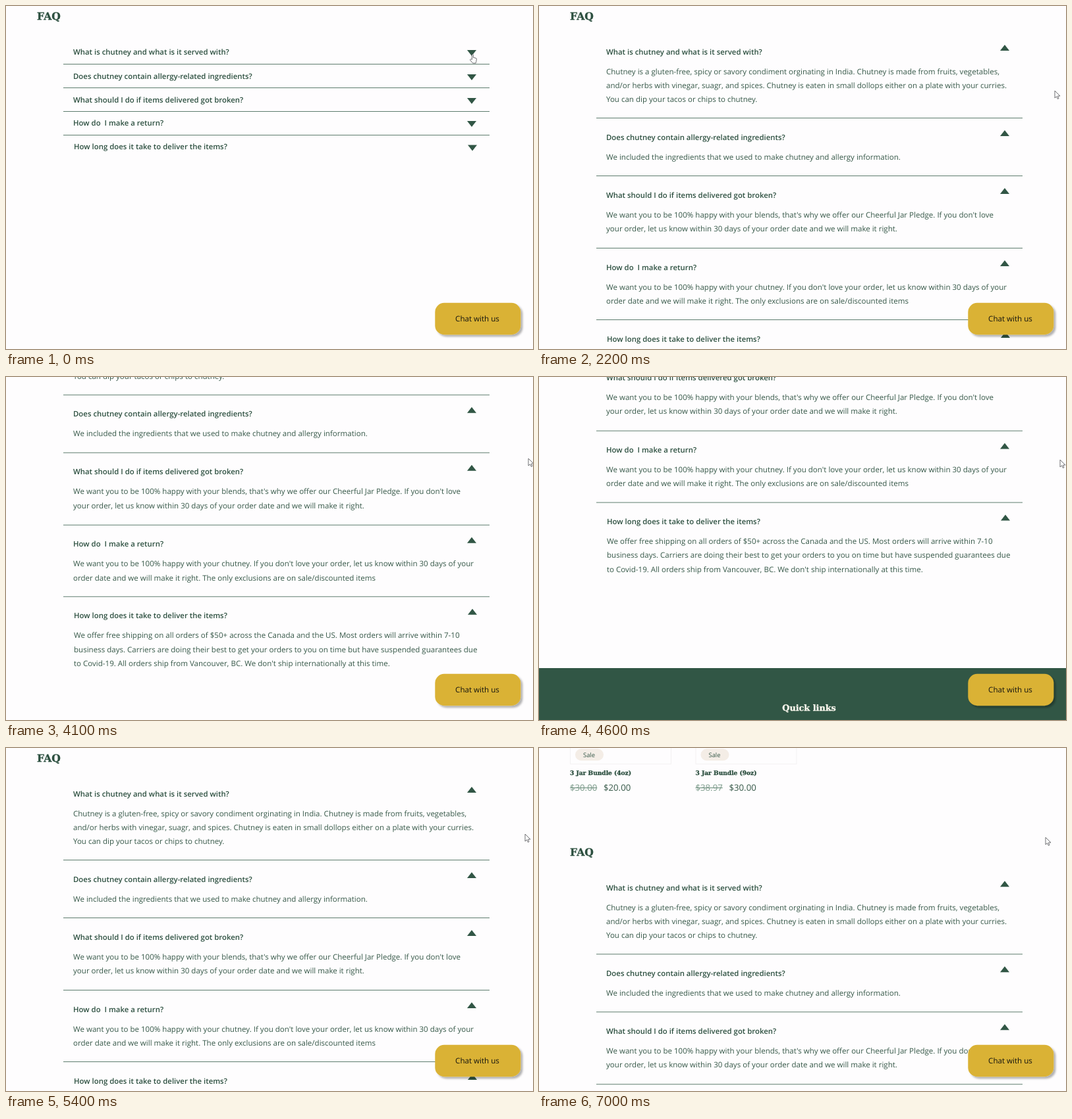
An HTML page that plays this animation: 800x522 px, repeating every 7.1 s.

```html
<!DOCTYPE html>
<html lang="en">
<head>
<meta charset="utf-8">
<title>FAQ</title>
<style>
  html, body { margin: 0; width: 100%; height: 100%; overflow: hidden; background: #fefdfe; }
  svg { display: block; }
  text { font: 11.55px "Open Sans", "Liberation Sans", sans-serif; fill: #365848; white-space: pre; text-rendering: geometricPrecision; }
  .question { font-size: 11.4px; font-weight: 600; fill: #2d5040; }
  .serif { font-family: "DejaVu Serif", serif; font-weight: bold; fill: #2d5040; stroke: #2d5040; stroke-width: .35; }
  .title { font-size: 15.6px; }
  .product { font-size: 9.05px; }
  .price { font-size: 13.2px; }
  .old { fill: #7b9a8a; text-decoration: line-through; }
  .sale { font-size: 9.4px; }
  .links { font-size: 12.8px; fill: #fbf8ee; stroke: #fbf8ee; }
  .chat { font-size: 11.6px; fill: #14140f; }
  .green { fill: #315645; }
  .rule { stroke: #5d7c6d; }
  .cursor { fill: #fff; stroke: #55555a; stroke-width: .85; stroke-linejoin: round; }
</style>
</head>
<body>
<svg width="800" height="522" viewBox="0 0 800 522">
  <defs>
    <filter id="shadow" x="-10%" y="-20%" width="125%" height="150%">
      <feDropShadow dx="3" dy="3" stdDeviation="1.5" flood-color="#000" flood-opacity=".3"/>
    </filter>
  </defs>
  <g id="page">
    <g id="products"></g>
    <text class="serif title" x="47" y="21">FAQ</text>
    <g id="closed"></g>
    <g id="open"></g>
    <rect class="green" y="729.5" width="800" height="400"/>
    <text class="serif links" x="410" y="794.5" text-anchor="middle">Quick links</text>
  </g>
  <rect x="651.3" y="451.8" width="130" height="48.4" rx="14" fill="#dab234" filter="url(#shadow)"/>
  <text class="chat" x="715.5" y="480" text-anchor="middle">Chat with us</text>
  <path id="hand" class="cursor" transform="translate(704 73)"
    d="M3.4 8.4V1.4Q3.4.4 4.4.4T5.4 1.4V5.4L9 6.2Q10.4 6.6 10.3 8L9.8 11.4 9 14H4.6L.8 9.6Q.2 8.4 1.2 8T3.4 8.4Z"/>
  <path id="arrow" class="cursor" d="M0 0V11L2.6 8.7 4.3 12.4 6 11.7 4.4 8H8Z"/>
</svg>
<script>
const $ = id => document.getElementById(id);
const LOOP = 7100, STEP = 100, OPEN_AT = 400, WHEEL = 143.25;

const faq = [
  { q: "What is chutney and what is it served with?", closedY: 69.5, openY: 69.5, answer: [
    "Chutney is a gluten-free, spicy or savory condiment orginating in India. Chutney is made from fruits, vegetables,",
    "and/or herbs with vinegar, suagr, and spices. Chutney is eaten in small dollops either on a plate with your curries.",
    "You can dip your tacos or chips to chutney."] },
  { q: "Does chutney contain allergy-related ingredients?", closedY: 106.5, openY: 199.5, answer: [
    "We included the ingredients that we used to make chutney and allergy information."] },
  { q: "What should I do if items delivered got broken?", closedY: 142.5, openY: 287.5, answer: [
    "We want you to be 100% happy with your blends, that's why we offer our Cheerful Jar Pledge. If you don't love",
    "your order, let us know within 30 days of your order date and we will make it right."] },
  { q: "How do  I make a return?", closedY: 177.5, openY: 397.5, answer: [
    "We want you to be 100% happy with your chutney. If you don't love your order, let us know within 30 days of your",
    "order date and we will make it right. The only exclusions are on sale/discounted items"] },
  { q: "How long does it take to deliver the items?", closedY: 214, openY: 506.5, answer: [
    "We offer free shipping on all orders of $50+ across the Canada and the US. Most orders will arrive within 7-10",
    "business days. Carriers are doing their best to get your orders to you on time but have suspended guarantees due",
    "to Covid-19. All orders ship from Vancouver, BC. We don't ship internationally at this time."] }
];

const text = (x, y, str, cls = "") => `<text class="${cls}" x="${x}" y="${y}">${str}</text>`;
const rule = y => `<path class="rule" d="M87 ${y}H734"/>`;
const triangle = (x, base, tip) => `<path class="green" d="M${x} ${base}h14L${x + 7} ${tip}Z"/>`;

faq.forEach(({ q, closedY, openY, answer }, i) => {
  const shift = i === 4 ? 1 : 0, x = 102 + shift, arrowX = 700 + shift;
  $("closed").innerHTML += text(x, closedY + 4, q, "question")
    + triangle(arrowX, closedY - 2.5, closedY + 6.5)
    + (i ? rule(52.5 + 36 * i) : "");
  $("open").innerHTML += text(x, openY + 4, q, "question")
    + triangle(arrowX, openY - 1.5, openY - 10.5)
    + (i ? rule(openY - 29) : "")
    + answer.map((line, n) => text(x, openY + 34.2 + 21.2 * n, line)).join("");
});

[[47, "4oz", "$30.00", "$20.00"], [237.5, "9oz", "$38.97", "$30.00"]].forEach(([x, size, was, now]) => {
  $("products").innerHTML += `<rect x="${x + .5}" y="-280" width="153" height="161" fill="none" stroke="#f3f1f2"/>
    <rect x="${x + 8}" y="-142" width="43" height="18" rx="9" fill="#f4ede6"/>`
    + text(x + 20, -129.5, "Sale", "sale")
    + text(x, -102.5, `3 Jar Bundle (${size})`, "serif product")
    + text(x, -78, was, "price old")
    + text(x + 51, -78, now, "price");
});

// Each move: start, end, then the value(s) reached at the end.
const scrollMoves = [
  [3200, 3600, WHEEL], [4100, 4600, 2 * WHEEL], [4900, 5000, WHEEL], [5100, 5400, 0], [5900, 6200, -WHEEL]
];
const cursorMoves = [
  [700, 800, 704, 67], [800, 900, 704, 75], [1000, 1700, 783, 129], [3200, 3600, 792, 125],
  [4000, 4100, 793, 124], [4100, 4600, 791, 126], [5100, 5400, 788, 131], [6800, 7000, 769, 136]
];

function follow(moves, from, t) {
  return moves.reduce((value, [start, end, ...to]) => {
    const p = Math.min(1, Math.max(0, (t - start) / (end - start)));
    const eased = p * p * (3 - 2 * p);
    return value.map((v, i) => v + (to[i] - v) * eased);
  }, from);
}

const show = (id, on) => $(id).style.display = on ? "" : "none";

function draw() {
  const t = Math.floor(performance.now() % LOOP / STEP) * STEP;
  const opened = t >= OPEN_AT;
  show("closed", !opened);
  show("hand", !opened);
  show("open", opened);
  show("arrow", opened);
  $("page").setAttribute("transform", `translate(0 ${-follow(scrollMoves, [0], t)[0]})`);
  $("arrow").setAttribute("transform", `translate(${follow(cursorMoves, [704, 74], t)})`);
  requestAnimationFrame(draw);
}
draw();
</script>
</body>
</html>
```
